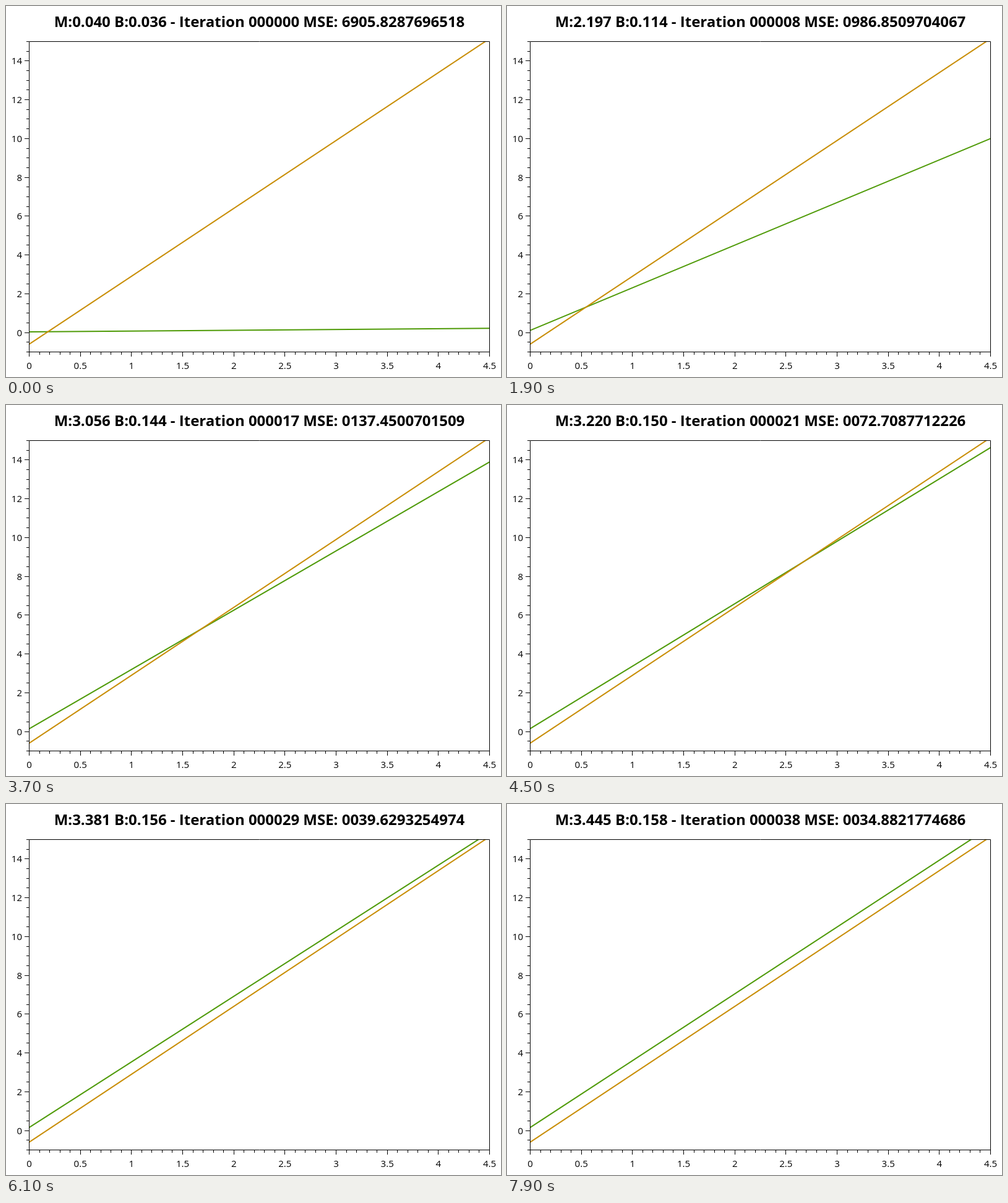
Write an HTML page with a canvas that moves like this. It is 800 px wide and 600 px high and loops after 8 s.

```html
<!DOCTYPE html>
<html lang="en">
<head>
<meta charset="utf-8">
<title>Linear regression</title>
<style>
html, body { margin: 0; width: 100%; height: 100%; overflow: hidden; background: #fff; }
canvas { display: block; }
</style>
</head>
<body>
<canvas id="stage" width="800" height="600"></canvas>
<script>
const ctx = document.getElementById('stage').getContext('2d');
const LOOP = 8000;
const FONT = '"Open Sans", "Noto Sans", sans-serif';
const BOX = { x: 37, y: 57, w: 744, h: 502 };
const RATE = 0.88382; // error decay per iteration

// Known states of the descent: iteration, slope, intercept, error
const STATES = [
  [0, 0.040, 0.036, 6905.8287696518],
  [3, 1.104, 0.074, 3309.5237036099],
  [8, 2.197, 0.114, 986.8509704067],
  [13, 2.787, 0.135, 311.3385490666],
  [21, 3.220, 0.150, 72.7087712226],
  [29, 3.381, 0.156, 39.6293254974],
  [38, 3.445, 0.158, 34.8821774686]
];

const px = x => BOX.x + x * BOX.w / 4.5;
const py = y => BOX.y + (15 - y) * BOX.h / 16;
const snap = v => Math.round(v - 0.01) + 0.5;

// Geometric decay between neighbouring states
function stateAt(k) {
  const i = Math.max(1, STATES.findIndex(s => s[0] >= k));
  const a = STATES[i - 1], b = STATES[i];
  const mix = (col, r) => {
    const part = (r ** a[0] - r ** k) / (r ** a[0] - r ** b[0]);
    return a[col] + (b[col] - a[col]) * part;
  };
  return { m: mix(1, RATE), b: mix(2, RATE), mse: mix(3, RATE * RATE) };
}

function text(str, x, y, font, align) {
  ctx.font = font + ' ' + FONT;
  ctx.textAlign = align;
  ctx.fillText(str, x, y);
}

function plot(m, b, color) {
  ctx.strokeStyle = color;
  ctx.lineWidth = 2;
  ctx.beginPath();
  ctx.moveTo(px(0) + 0.5, py(b) + 0.5);
  ctx.lineTo(px(4.5) + 0.5, py(4.5 * m + b) + 0.5);
  ctx.stroke();
}

function axes() {
  ctx.strokeStyle = ctx.fillStyle = '#000';
  ctx.lineWidth = 1;
  ctx.beginPath();
  ctx.rect(BOX.x + 0.5, BOX.y + 0.5, BOX.w, BOX.h);
  const bottom = BOX.y + BOX.h;
  for (let i = 0; i <= 45; i++) {
    const x = snap(px(i / 10)), major = i % 5 === 0;
    ctx.moveTo(x, bottom);
    ctx.lineTo(x, bottom + (major ? 8 : 5));
    if (major) text(String(i / 10), px(i / 10) + 0.5, 587, '15px', 'center');
  }
  for (let i = -2; i <= 30; i++) {
    const y = snap(py(i / 2)), major = i >= 0 && i % 4 === 0;
    ctx.moveTo(BOX.x, y);
    ctx.lineTo(BOX.x - (major ? 7 : 4), y);
    if (major) text(String(i / 2), 26, Math.round(y + 5), '15px', 'right');
  }
  ctx.stroke();
}

function draw(now) {
  const t = now % LOOP;
  const k = t < 500 ? 0 : Math.floor((t - 300) / 200);
  const s = stateAt(k);
  ctx.fillStyle = '#fff';
  ctx.fillRect(0, 0, 800, 600);

  ctx.save();
  ctx.beginPath();
  ctx.rect(BOX.x, BOX.y, BOX.w + 1, BOX.h + 1);
  ctx.clip();
  plot(s.m, s.b, '#4e9a06');
  plot(3.5, -0.6, '#c88d00');
  ctx.restore();

  axes();
  const iter = String(k).padStart(6, '0');
  const mse = s.mse.toFixed(10).padStart(15, '0');
  text(`M:${s.m.toFixed(3)} B:${s.b.toFixed(3)} - Iteration ${iter} MSE: ${mse}`,
    409.5, 34, 'bold 24px', 'center');
}

const start = performance.now();
function tick() {
  draw(performance.now() - start);
  requestAnimationFrame(tick);
}
tick();
</script>
</body>
</html>
```
